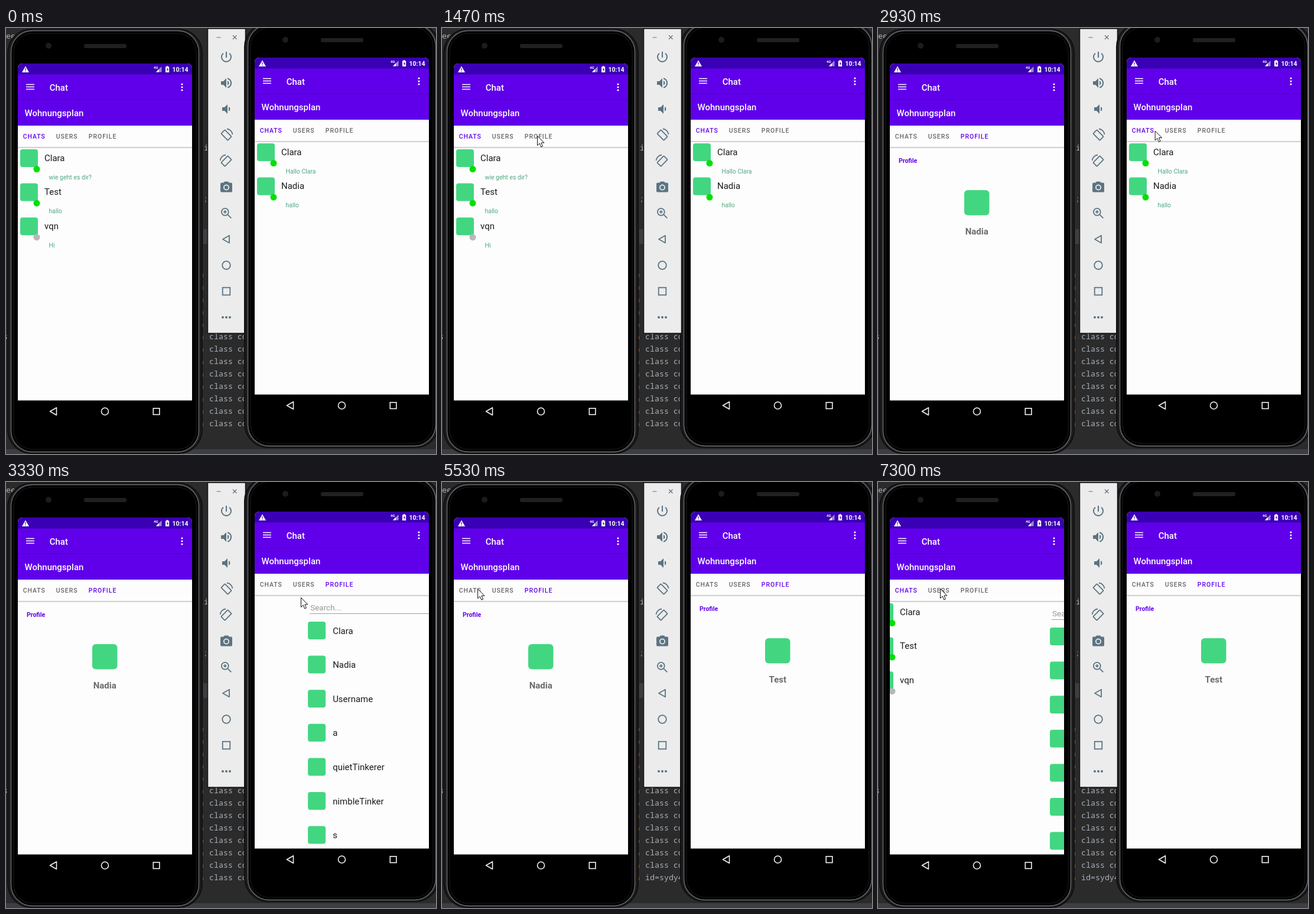
Animation, 728 px wide and 720 px high, one loop 8000 ms. Source, as an HTML page:

```html
<!DOCTYPE html>
<html lang="de">
<head>
<meta charset="utf-8">
<title>Chat</title>
<style>
  html, body { margin: 0; width: 100%; height: 100%; overflow: hidden; background: #2b2b2b; }
  svg { display: block; }
  text { font-family: Roboto, "Open Sans", sans-serif; white-space: pre; }
  .title { font-size: 15px; font-weight: 500; fill: #fff; }
  .tab { font-size: 10.5px; font-weight: 500; letter-spacing: .94px; fill: #666; }
  .tab.on { fill: #6200ee; }
  .name { font-size: 15px; fill: #1c1c1c; }
  .msg { font-size: 10.5px; fill: #4fa882; }
  .hint { font-size: 13.5px; fill: #979797; }
  .head { font-size: 10.5px; font-weight: 700; fill: #6200ee; }
  .user { font-size: 15px; font-weight: 700; fill: #6c6c6c; text-anchor: middle; }
  .code text { font: 13.3px "Noto Sans Mono", "DejaVu Sans Mono", monospace; fill: #a9b0b8; }
  .code .mark { fill: #b0702c; }
</style>
</head>
<body>
<script>
const LOOP = 8000, PAGE = 295, ROW = 57.6;
const GREEN = '#43d681', BAR = '#6000ea', STATUS = '#3a00b4', STEEL = '#5b7482';
const range = n => [...Array(n).keys()];
const text = (cls, x, y, s, id = '') => `<text class="${cls}" x="${x}" y="${y}" ${id && `id="${id}"`}>${s}</text>`;
const rect = (x, y, w, h, fill, r = 0) => `<rect x="${x}" y="${y}" width="${w}" height="${h}" rx="${r}" fill="${fill}"/>`;
const dot = (x, y, r, fill) => `<circle cx="${x}" cy="${y}" r="${r}" fill="${fill}"/>`;
const path = (d, extra = '') => `<path d="${d}" ${extra}/>`;
const icon = (x, y, size, r) => rect(x, y, size, size, GREEN, r);

const chatPage = rows => rows.map(([name, msg, online], i) => {
  const y = i * ROW;
  return icon(4, 145 + y, 30, 4) + dot(32, 178.5 + y, 5.5, online ? '#05df05' : '#b8b8b8') +
    text('name', 45, 164.5 + y, name) + text('msg', 52.5, 195.5 + y, msg);
}).join('');

const usersPage = names => text('hint', 8, 166.5, 'Search...') + rect(7, 172, 281, 1, '#a0a0a0') +
  names.map((name, i) => icon(4, 186 + i * ROW, 30, 4) + text('name', 46, 206.5 + i * ROW, name)).join('');

const profilePage = (name, id) => text('head', 15, 167.7, 'Profile') + icon(126, 214, 42.5, 6) +
  text('user', 147.3, 289, name, id);

const statusBar = rect(0, 0, PAGE, 18.5, STATUS) +
  path('M13 4.5l6 10.5h-12z', 'fill="#fff"') + path('M13 8v3.5M13 12.5v1.2', `stroke="${STATUS}" stroke-width="1.2"`) +
  '<text x="230" y="9" font-size="6" font-weight="700" fill="#fff">4G</text>' +
  path('M243.5 5v9.5h-9.5z', 'fill="#a088d8"') + path('M239 9.5v5h-5z', 'fill="#fff"') +
  path('M250 5.5h1.8v-1.2h2.6v1.2h1.8v9.5h-6.2z', 'fill="#fff"') + path('M253.7 7l-2 3.5h1.4v2.8l2-3.6h-1.4z', `fill="${STATUS}"`) +
  '<text x="261.5" y="13.7" font-size="10.5" font-weight="700" fill="#fff">10:14</text>';

const phone = (id, dx, dy, pages) => `<g transform="translate(${dx} ${dy})">
  <rect x="3" y="2" width="329" height="717" rx="40" fill="#1c1c1e" stroke="#101010" stroke-width="2"/>
  <rect x="8.5" y="4.5" width="318" height="712" rx="36" fill="#000" stroke="#5c5c60" stroke-width="1.8"/>
  <rect x="13" y="9" width="309" height="703" rx="32" fill="#000" stroke="#1d1d1f"/>
  ${dot(72, 30, 5, '#1c1c1e')}${rect(132, 27, 72, 7, '#202022', 3)}
  <svg x="20" y="60" width="${PAGE}" height="569.5">
    <clipPath id="${id}Clip"><rect width="${PAGE}" height="590" rx="8"/></clipPath>
    <g clip-path="url(#${id}Clip)">
      ${rect(0, 0, PAGE, 570, '#fdfdfd')}
      <g id="${id}Pages">${pages.map((p, i) => `<g transform="translate(${i * PAGE})">${p}</g>`).join('')}</g>
      ${rect(0, 18, PAGE, 87, BAR)}${rect(0, 60.5, PAGE, 1.5, '#5400d0')}${statusBar}
      ${rect(0, 141, PAGE, 1.5, '#c4c4c4')}${rect(0, 142.5, PAGE, 1, '#e8e8e8')}
      ${path('M14 35.5h14M14 39.5h14M14 43.5h14', 'stroke="#fff" stroke-width="1.6"')}
      ${[35, 40, 45].map(y => dot(278, y, 1.6, '#fff')).join('')}
      ${text('title', 53.7, 45.7, 'Chat')}${text('title', 11.5, 88.7, 'Wohnungsplan')}
      <g id="${id}Tabs">${text('tab', 8.7, 126.8, 'CHATS')}${text('tab', 64.8, 126.8, 'USERS')}${text('tab', 119.8, 126.8, 'PROFILE')}</g>
    </g>
  </svg>
  <g fill="none" stroke="#f2f2f2" stroke-width="1.6">
    ${path('M74.5 648l11-6.3v12.6z', 'stroke-linejoin="round"')}
    <circle cx="167.5" cy="648" r="6"/><rect x="249.3" y="642.8" width="10.6" height="10.6"/>
  </g>
</g>`;

const glyph = (i, body) => `<g transform="translate(361 ${37 + 44 * i})">${body}</g>`;
const tilt = '<rect x="7.5" y="4" width="9" height="16" rx="1" transform="rotate(-45 12 12)"/><path d="M13 1.5a10.5 10.5 0 0 1 9.5 9.5"/>';
const line = body => `<g fill="none" stroke="${STEEL}" stroke-width="1.8">${body}</g>`;
const toolbar = `<g id="toolbar" fill="${STEEL}">
  <rect x="341.5" y="1" width="64" height="515" fill="#ececec" stroke="#161616" stroke-width="1.5"/>
  ${path('M356.5 16h7M384 12.5l6.5 6.5M390.5 12.5l-6.5 6.5', `stroke="${STEEL}" stroke-width="1.2"`)}
  ${[
    path('M13 3h-2v10h2V3zm4.83 2.17l-1.42 1.42A6.92 6.92 0 0 1 19 12c0 3.87-3.13 7-7 7A7 7 0 0 1 7.58 6.58L6.17 5.17A8.93 8.93 0 0 0 3 12a9 9 0 0 0 18 0c0-2.74-1.23-5.18-3.17-6.83z'),
    path('M3 9v6h4l5 5V4L7 9zm13.5 3A4.5 4.5 0 0 0 14 8v8a4.5 4.5 0 0 0 2.5-4zM14 3.2v2.1a7 7 0 0 1 0 13.4v2.1a9 9 0 0 0 0-17.6z'),
    path('M5 9v6h4l5 5V4L9 9zm13.5 3A4.5 4.5 0 0 0 16 8v8a4.5 4.5 0 0 0 2.5-4z'),
    line(tilt),
    line(`<g transform="matrix(-1 0 0 1 24 0)">${tilt}</g>`),
    path('M9 2.5L7.2 4.5H4a2 2 0 0 0-2 2v12a2 2 0 0 0 2 2h16a2 2 0 0 0 2-2v-12a2 2 0 0 0-2-2h-3.2L15 2.5zM12 17.5a5 5 0 1 1 0-10a5 5 0 0 1 0 10z', 'fill-rule="evenodd"') + dot(12, 12.5, 3.2, STEEL),
    line('<circle cx="9.8" cy="9.8" r="6"/><path d="M14.3 14.3l6 6M7 9.8h5.6M9.8 7v5.6"/>'),
    line('<path d="M6 12l11-6.3v12.6z" stroke-linejoin="round"/>'),
    line('<circle cx="12" cy="12" r="6.8"/>'),
    line('<rect x="5.7" y="5.7" width="12.6" height="12.6"/>'),
    [6, 12, 18].map(x => dot(x, 12, 2, STEEL)).join('')
  ].map((body, i) => glyph(i, body)).join('')}
</g>`;

const code = `<g class="code">
  ${text('', 0, 18, 'ee')}${text('', 335, 207, 'i')}${text('mark', 334, 293, ';')}
  ${rect(334, 340, 7, 25, '#3c3f41')}${text('', -5, 526, 's')}
  ${range(13).map(i => text('mark', 328.5, 421.5 + 21 * i, ')')).join('')}
  ${range(8).map(i => text('', 344, 526 + 21 * i, 'class co', i === 7 ? 'lastLine' : '')).join('')}
  ${rect(0, 712, 728, 8, '#3c3f41')}
</g>`;

const others = ['Username', 'a', 'quietTinkerer', 'nimbleTinker', 's'];
document.body.innerHTML = `<svg width="728" height="720" viewBox="0 0 728 720">
  ${rect(0, 0, 728, 720, '#2b2b2b')}${code}
  ${phone('left', 0, 0, [
    chatPage([['Clara', 'wie geht es dir?', 1], ['Test', 'hallo', 1], ['vqn', 'Hi', 0]]),
    usersPage(['Clara', 'Test', ...others]), profilePage('Username', 'leftUser')])}
  <g id="layers">${toolbar}<g id="rightPhone">${phone('right', 401, -10, [
    chatPage([['Clara', 'Hallo Clara', 1], ['Nadia', 'hallo', 1]]),
    usersPage(['Clara', 'Nadia', ...others]), profilePage('Test', 'rightUser')])}</g></g>
  <path id="cursor" d="M.5 .5v16l3.7-3.5 2.5 6 2.7-1.1-2.5-5.9h5z" fill="#fff" stroke="#111" stroke-width="1"/>
</svg>`;

// Each move: start time, end time, then the values reached; equal times jump.
const cursorMoves = [
  [370, 670, 145, 192], [900, 1080, 112, 201], [1080, 1270, 161, 182], [2200, 2200, 318, 182],
  [2870, 2970, 565, 168], [3330, 3330, 499, 195], [4330, 4470, 146, 177], [4630, 4630, 143, 187],
  [4970, 5200, 118, 191], [5200, 5600, 48, 178], [6030, 6080, 32, 183], [6080, 6130, 43, 180],
  [6630, 6630, 74, 184], [6830, 6870, 105, 180]];
const leftMoves = [[1870, 1870, .1], [1900, 1900, .3], [1970, 1970, .6], [2200, 2200, 1.64], [2870, 2870, 2],
  [6830, 6830, 1.85], [6870, 6870, 1.13], [7130, 7130, .095]];
const rightMoves = [[3300, 3300, .25], [3330, 3330, .708], [4330, 4330, 1.6], [4400, 4400, 1.9], [4470, 4470, 2]];

function follow(t, start, moves) {
  let now = start;
  for (const [from, to, ...goal] of moves) {
    if (t < from) break;
    const k = t >= to ? 1 : (t - from) / (to - from);
    now = now.map((v, i) => v + (goal[i] - v) * k);
  }
  return now;
}

const $ = id => document.getElementById(id);
const leftMsgs = $('leftPages').querySelectorAll('.msg');
function setPhone(id, scroll, tab) {
  $(id + 'Pages').setAttribute('transform', `translate(${-scroll * PAGE})`);
  [...$(id + 'Tabs').children].forEach((el, i) => el.classList.toggle('on', i === tab));
}

function draw(t) {
  setPhone('left', follow(t, [0], leftMoves)[0], t >= 1870 && t < 6830 ? 2 : 0);
  setPhone('right', follow(t, [0], rightMoves)[0], t >= 3300 ? 2 : 0);
  $('leftUser').textContent = t < 2870 ? 'Username' : 'Nadia';
  $('lastLine').textContent = t < 4330 ? 'class co' : 'id=sydy4';
  leftMsgs.forEach(el => el.setAttribute('opacity', t < 6830 ? 1 : 0));
  const toolbarOnTop = t >= 1470 && t < 2870 || t >= 6430;
  const top = $(toolbarOnTop ? 'toolbar' : 'rightPhone');
  if ($('layers').lastElementChild !== top) $('layers').append(top);
  $('cursor').setAttribute('transform', `translate(${follow(t, [-14, 300], cursorMoves)})`);
}

const begin = performance.now();
function tick() {
  draw((performance.now() - begin) % LOOP);
  requestAnimationFrame(tick);
}
tick();
</script>
</body>
</html>
```
